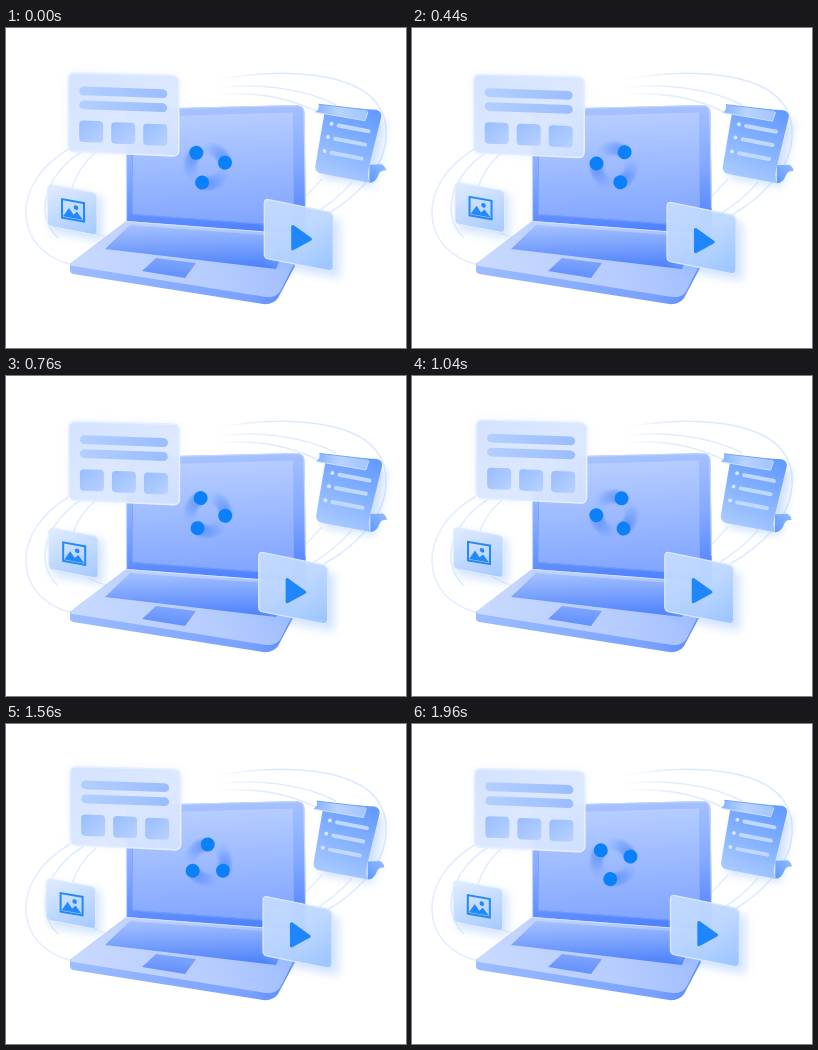
Recreate the animation shown at these times as an HTML page. Size 400x320 px, loop 2 s.

```html
<!DOCTYPE html>
<html lang="en">
<head>
<meta charset="utf-8">
<title>Laptop with floating cards</title>
<style>
html, body { margin: 0; width: 100%; height: 100%; overflow: hidden; background: #fff; }
svg { display: block; width: 400px; height: 320px; }
</style>
</head>
<body>
<svg viewBox="0 0 400 320">
  <defs>
    <linearGradient id="lid" x1=".4" y1="0" x2=".5" y2="1">
      <stop offset="0" stop-color="#a9c3ff"/><stop offset=".5" stop-color="#84a9ff"/><stop offset="1" stop-color="#4c80ff"/>
    </linearGradient>
    <linearGradient id="screen" x1=".45" y1="0" x2=".55" y2="1">
      <stop offset="0" stop-color="#b7ceff"/><stop offset="1" stop-color="#81a5ff"/>
    </linearGradient>
    <linearGradient id="deck" x1="0" y1=".6" x2="1" y2=".5">
      <stop offset="0" stop-color="#c9daff"/><stop offset=".6" stop-color="#b6ccff"/><stop offset="1" stop-color="#9dbbff"/>
    </linearGradient>
    <linearGradient id="edge">
      <stop offset="0" stop-color="#9dbdff"/><stop offset=".8" stop-color="#78a1ff"/><stop offset="1" stop-color="#5587fb"/>
    </linearGradient>
    <linearGradient id="keys" x1=".45" y1="0" x2=".55" y2="1">
      <stop offset="0" stop-color="#a3bfff"/><stop offset="1" stop-color="#4d81fb"/>
    </linearGradient>
    <linearGradient id="pad" x1=".6" y1="0" x2=".4" y2="1">
      <stop offset="0" stop-color="#81a6ff"/><stop offset="1" stop-color="#5f8ffb"/>
    </linearGradient>
    <linearGradient id="panelFill" x1="0" y1="0" x2="1" y2="1">
      <stop offset="0" stop-color="#d3e2ff"/><stop offset=".6" stop-color="#dce8ff" stop-opacity=".95"/><stop offset="1" stop-color="#d3e2ff" stop-opacity=".88"/>
    </linearGradient>
    <linearGradient id="bar">
      <stop offset="0" stop-color="#b3cfff"/><stop offset="1" stop-color="#9abdff"/>
    </linearGradient>
    <linearGradient id="tile" x1="0" y1="0" x2="1" y2="1">
      <stop offset="0" stop-color="#98bdff"/><stop offset="1" stop-color="#b9d2ff"/>
    </linearGradient>
    <linearGradient id="cardFill" x1=".3" y1="0" x2=".7" y2="1">
      <stop offset="0" stop-color="#dce9ff"/><stop offset="1" stop-color="#a9ccff"/>
    </linearGradient>
    <linearGradient id="videoFill" x1=".2" y1="0" x2=".8" y2="1">
      <stop offset="0" stop-color="#c4dbff" stop-opacity=".95"/><stop offset=".5" stop-color="#bcd7ff" stop-opacity=".94"/><stop offset="1" stop-color="#9dc6ff" stop-opacity=".97"/>
    </linearGradient>
    <linearGradient id="paper" x1=".7" y1="0" x2=".3" y2="1">
      <stop offset="0" stop-color="#649bff"/><stop offset=".5" stop-color="#86b2ff"/><stop offset="1" stop-color="#acccff"/>
    </linearGradient>
    <linearGradient id="flap">
      <stop offset="0" stop-color="#85b1ff"/><stop offset=".45" stop-color="#b8d3ff"/><stop offset="1" stop-color="#a2c4ff"/>
    </linearGradient>
    <linearGradient id="curl" x1="0" y1="1" x2="1" y2="0">
      <stop offset="0" stop-color="#5c98ff"/><stop offset="1" stop-color="#94bcff"/>
    </linearGradient>
    <linearGradient id="fadeIn" gradientUnits="userSpaceOnUse" x1="210" y1="0" x2="265" y2="0">
      <stop offset="0" stop-color="#dceaff" stop-opacity="0"/><stop offset="1" stop-color="#dceaff"/>
    </linearGradient>
    <filter id="soft" x="-40%" y="-40%" width="180%" height="180%"><feGaussianBlur stdDeviation="5"/></filter>
    <filter id="haze" x="-30%" y="-30%" width="160%" height="160%"><feGaussianBlur stdDeviation="1.2"/></filter>
  </defs>

  <g fill="none" stroke="#e2edff" stroke-width="1.5">
    <g stroke="url(#fadeIn)">
      <path d="M212 52C258 42 314 43 346 57C374 69 384 91 379 118C374 145 348 171 318 188"/>
      <path d="M212 60C248 55 296 59 330 77"/>
      <path d="M212 67C244 63 282 68 316 86"/>
    </g>
    <path d="M316 151L299 169"/>
    <path d="M346 154Q330 173 305 188"/>
    <path d="M64 120C34 138 19 162 20 187C21 212 39 230 66 237"/>
    <path d="M78 122C52 138 39 160 39 181C39 192 44 202 52 210"/>
    <path d="M90 124Q73 138 66 160M78 199Q91 208 108 211"/>
  </g>

  <g id="laptop">
    <path d="M64 235L64 243Q64 245 67 246L257 276Q267 277 272 270L289 238L284 225Z" fill="url(#edge)"/>
    <path d="M120 193L300 206L287 238L275 262Q271 270 260 269L67 238Q62 237 66 234Z" fill="url(#deck)"/>
    <path d="M124 197L284 209L270 241L99 221Z" fill="url(#keys)"/>
    <path d="M150 230L190 235L179 250L136 243Z" fill="url(#pad)"/>
    <path d="M120 88Q120 82 127 81L290 77Q298 77 298.500 84L300 207L120 193Z" fill="url(#lid)"/>
    <path d="M120.500 193V88Q120.500 82 127 81.500L290 77.500Q297.500 77.500 298 84L299.500 180" fill="none" stroke="#c3d6ff" stroke-width="1.200"/>
    <path d="M126 89L287 84.500L288 198L126 186Z" fill="url(#screen)"/>
    <path d="M126.500 89V186.500L288 198.500" fill="none" stroke="#779fff" stroke-width=".8"/>
    <path d="M120 193.500L280 205.500" stroke="#d6e3ff" stroke-width="1.200"/>
  </g>

  <g id="spinner"></g>

  <g id="panel">
    <path d="M68 44L166 47Q173 47.500 173 54V121Q173 128 166 127.500L68 123Q61.500 122.500 61.500 116V51Q61.500 44 68 44Z" fill="#a8c6ff" opacity=".18" filter="url(#soft)"/>
    <path d="M68 44.500L166 47Q172.500 47.500 172.500 54V121Q172.500 128 166 127.500L68 123Q62 122.500 62 116V51Q62 44.500 68 44.500Z" fill="url(#panelFill)" stroke="#e5efff" stroke-width="1.600"/>
    <g transform="translate(73 58) skewY(2)">
      <rect width="88" height="8.800" rx="4.400" fill="url(#bar)"/>
      <rect y="14" width="88" height="8.800" rx="4.400" fill="url(#bar)"/>
      <g fill="url(#tile)">
        <rect y="34" width="24" height="21.500" rx="4"/>
        <rect x="32" y="34.500" width="24" height="21.500" rx="4"/>
        <rect x="64" y="35" width="24" height="21.500" rx="4"/>
      </g>
    </g>
  </g>

  <g id="photo">
    <path d="M44 160L95 169V213L44 204Z" fill="#8bb8ff" opacity=".4" filter="url(#soft)"/>
    <path d="M45 157L86 164.500Q90 165.500 90 169V203Q90 207 86 206.500L44 198.500Q40.500 197.500 40.500 194V160Q41 156.500 45 157Z" fill="url(#cardFill)" stroke="#e3efff"/>
    <g transform="translate(54 170) skewY(10)" fill="#2389fa">
      <rect x="1" y="1" width="22" height="18.500" fill="none" stroke="#2389fa" stroke-width="2"/>
      <path d="M2 18L8 8.500L12.500 14.500L16 11L22 18Z"/>
      <circle cx="15" cy="7" r="2.300"/>
    </g>
  </g>

  <g id="video">
    <path d="M264 178L334 192V250L264 237Z" fill="#8bb8ff" opacity=".4" filter="url(#soft)"/>
    <path d="M263 171.500L322 183.500Q327.500 185 327.500 190V238Q327.500 243 323 242.500L262 230.500Q258.500 229.500 258.500 226V175Q258.500 170.500 263 171.500Z" fill="url(#videoFill)" stroke="#d9e8ff" stroke-width="1.300"/>
    <path d="M287 198.500V220.500L304.500 211Z" fill="#1f87fb" stroke="#1f87fb" stroke-width="3.200" stroke-linejoin="round"/>
  </g>

  <g id="scroll">
    <path d="M322 90L381 92L369 158L316 150Z" fill="#8bb8ff" opacity=".42" filter="url(#soft)"/>
    <path d="M364 137L376 136.500Q380 138 380.500 143Q375 142 373 147Q370 155 364 155Z" fill="url(#curl)"/>
    <path d="M320 79L371 82Q377 84 375.500 90L363 141Q361 150 364.500 155L314 145.500Q308.500 143 310 137Z" fill="url(#paper)"/>
    <path d="M313 76.500L358 82Q362 82 362.500 84L359.500 93L309.500 84.500Q314 82 313 76.500Z" fill="url(#flap)"/>
    <path d="M310 84.500L359.500 93L362.500 84" fill="none" stroke="#cfe1ff" stroke-width=".9"/>
    <path d="M313 76.500L360 82" stroke="#73a5ff" stroke-width="1"/>
    <g id="items" stroke="#bfd9ff" stroke-width="4" stroke-linecap="round"></g>
  </g>
</svg>

<script>
const LOOP = 2000, STEP = 40, TAU = Math.PI * 2;
const byId = id => document.getElementById(id);

function add(parent, tag, attrs) {
  const el = document.createElementNS('http://www.w3.org/2000/svg', tag);
  for (const key in attrs) el.setAttribute(key, attrs[key]);
  return parent.appendChild(el);
}

// List rows on the paper
for (const [x, y] of [[326, 96], [322.5, 109.3], [319, 123.3]]) {
  add(byId('items'), 'circle', { cx: x, cy: y, r: 2, fill: '#d3e6ff', stroke: 'none' });
  add(byId('items'), 'path', { d: `M${x + 7} ${y + 1.8}l30 5.800` });
}

// Three balls, each trailing a fading arc
const spinner = byId('spinner');
const tails = add(spinner, 'g', { filter: 'url(#haze)' });
const RADIUS = 17.5, TRAIL = 20;
for (let ball = 0; ball < 3; ball++) {
  for (let i = TRAIL; i > 0; i--) {
    add(tails, 'circle', {
      cx: RADIUS, r: 6.8, fill: '#4b86f5',
      opacity: 0.1 * (1 - i / (TRAIL + 1)),
      transform: `rotate(${ball * 120 - i * 4})`
    });
  }
  add(spinner, 'circle', { cx: RADIUS, r: 7, fill: '#0a81fa', transform: `rotate(${ball * 120})` });
}

// Swing of 1 at its peak time, -1 half a loop later
const swing = (t, peak) => Math.cos(TAU * (t - peak) / LOOP);

const drift = {
  panel: t => [1.1 + 1.5 * swing(t, 1300), 0.1 + 1.9 * swing(t, 450)],
  photo: t => [1.1 + 1.5 * swing(t, 520), -2.7 + 2.7 * swing(t, 1990)],
  video: t => [-3 - 3 * swing(t, 890), 2.7 + 2.7 * swing(t, 890)],
  scroll: t => [-0.6 + 1.6 * swing(t, 470), 0.5 + 0.8 * swing(t, 1080)]
};

function draw(now) {
  const t = Math.floor((now % LOOP) / STEP) * STEP;
  for (const id in drift) {
    const [x, y] = drift[id](t);
    byId(id).setAttribute('transform', `translate(${x.toFixed(2)} ${y.toFixed(2)})`);
  }
  spinner.setAttribute('transform', `translate(201.800 138) rotate(${t / LOOP * 360 - 11})`);
}

let start;
function tick(now) {
  start ??= now;
  draw(now - start);
  requestAnimationFrame(tick);
}
draw(0);
requestAnimationFrame(tick);
</script>
</body>
</html>
```
